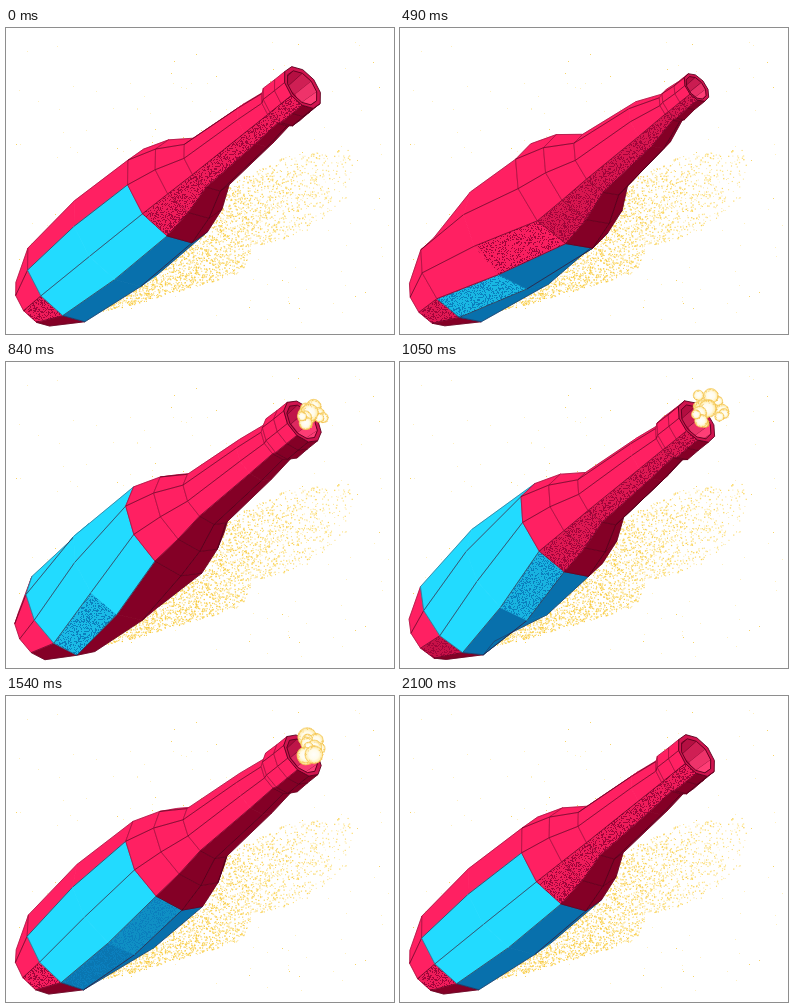
Animation, 388 px wide and 306 px high, one loop 2170 ms. Source, as an HTML page with a canvas:

```html
<!DOCTYPE html>
<html lang="en">
<head>
<meta charset="utf-8">
<title>Twisting bottle</title>
<style>
html, body { margin: 0; width: 100%; height: 100%; overflow: hidden; background: #fff; }
canvas { display: block; }
</style>
</head>
<body>
<canvas id="stage" width="388" height="306"></canvas>
<script>
const W = 388, H = 306, STEP = 70, STEPS = 31;
const ctx = document.getElementById('stage').getContext('2d');

// Bottle axis: mouth centre, direction to the mouth, direction across.
const MOUTH = [296.5, 59.5], U = [0.779, -0.627], V = [0.627, 0.779];
const SIDES = 10, FACET = 360 / SIDES, LABEL_SIDES = 5, START = -38, TILT = 0.56;

// Outline from base to mouth: [position on the axis, radius]
const PROFILE = [
  [-341, 29], [-307, 49], [-240, 57], [-173, 55], [-146, 46], [-123, 31],
  [-60, 25.5], [-32, 21.5], [-27, 25], [-13, 24.5], [0, 24.5]
];
const LABEL_FROM = 1, LABEL_TO = 3;
const SMOOTH = [2, 6];              // rings without a visible crease

const RED = [255, 32, 98], DARK_RED = [132, 0, 38];
const CYAN = [34, 219, 255], DARK_BLUE = [8, 112, 172];
const INK = 'rgba(60,0,25,0.65)';

const BURSTS = [
  { from: 8.5, life: 12.5, count: 14, reach: 50, seed: 8 },
  { from: 18.5, life: 10.5, count: 11, reach: 40, seed: 23 }
];

const rad = a => a * Math.PI / 180;
const clamp = x => Math.max(0, Math.min(1, x));
const lerp = (a, b, t) => a + (b - a) * t;
const smooth = x => { x = clamp(x); return x * x * (3 - 2 * x); };
const mix = (a, b, t) => `rgb(${a.map((c, i) => Math.round(lerp(c, b[i], t)))})`;

function seeded(seed) {
  return () => {
    seed = (seed + 0x6D2B79F5) | 0;
    let t = Math.imul(seed ^ seed >>> 15, 1 | seed);
    t = t + Math.imul(t ^ t >>> 7, 61 | t) ^ t;
    return ((t ^ t >>> 14) >>> 0) / 4294967296;
  };
}

function layer(w, h) {
  const c = document.createElement('canvas');
  c.width = w;
  c.height = h;
  return [c, c.getContext('2d')];
}

// One full turn: quick rise around the step `mid`, long settling.
function turn(f, mid, power) {
  const rise = x => x ** power / (x ** power + mid ** power);
  return 360 * rise(f) / rise(STEPS - 1);
}

// The base starts later than the neck and catches up faster, which twists the body.
function ringAngle(s, f) {
  return START + lerp(turn(f, 9.9, 6), turn(f, 10.2, 3.5), clamp((s + 307) / 134));
}

// At full squeeze the middle swells towards the neck and the mouth narrows.
function ringScale(s, f) {
  const squeeze = f <= 7 ? smooth((f - 1) / 6) : 1 - smooth((f - 7) / 4);
  return 1 + squeeze * (0.17 * smooth((s + 341) / 250) - 0.5 * smooth((s + 75) / 60));
}

const grains = {};
function grain(color, level) {
  const key = color + level;
  if (!grains[key]) {
    const size = 131, [tile, g] = layer(size, size), rnd = seeded(level * 77 + 5);
    g.fillStyle = color;
    for (let i = size * size * level / 10; i > 0; i--) {
      g.fillRect(Math.floor(rnd() * size), Math.floor(rnd() * size), 1, 1);
    }
    grains[key] = ctx.createPattern(tile, 'repeat');
  }
  return grains[key];
}

function makeShadow() {
  const [c, g] = layer(W, H), rnd = seeded(41);
  const shape = new Path2D('M92 284L125 277 178 262 236 244 246 219 298 205 345 166 352 119 278 128 215 160 150 215Z');
  g.fillStyle = '#fff';
  g.fillRect(0, 0, W, H);
  for (let i = 0; i < 22000; i++) {
    const x = 90 + rnd() * 265, y = 115 + rnd() * 172;
    const size = 0.7 + rnd() * 0.7, keep = 0.8 - (x - 100) / 330;
    if (rnd() > keep || !g.isPointInPath(shape, x, y)) continue;
    g.fillStyle = mix([247, 198, 50], [255, 236, 165], clamp((x - 190) / 170) * 0.5 + rnd() * 0.5);
    g.fillRect(x, y, size, size);
  }
  for (let i = 0; i < 170; i++) {
    g.fillStyle = rnd() < 0.3 ? '#f8d468' : '#fff0c0';
    g.fillRect(Math.floor(5 + rnd() * 380), Math.floor(14 + rnd() * 286), 1, 1);
  }
  return c;
}
const shadow = makeShadow();

function ring(s, r, f) {
  const angle = ringAngle(s, f), scaled = r * ringScale(s, f);
  const pts = Array.from({ length: SIDES }, (_, j) => {
    const a = rad(angle + j * FACET);
    const d = scaled * Math.sin(a), along = s - scaled * TILT * Math.cos(a);
    return [MOUTH[0] + along * U[0] + d * V[0], MOUTH[1] + along * U[1] + d * V[1]];
  });
  return { angle, pts };
}

function area(p) {
  return p.reduce((sum, [x, y], i) => {
    const [nx, ny] = p[(i + 1) % p.length];
    return sum + x * ny - nx * y;
  }, 0);
}

function trace(p) {
  ctx.beginPath();
  p.forEach(([x, y]) => ctx.lineTo(x, y));
  ctx.closePath();
}

function line(a, b) {
  ctx.strokeStyle = INK;
  ctx.lineWidth = 0.55;
  ctx.beginPath();
  ctx.moveTo(...a);
  ctx.lineTo(...b);
  ctx.stroke();
}

function fillFacet({ p, angle, blue }) {
  const t = clamp((angle + (blue ? 0 : 14) - 20) / 28);
  const color = blue ? mix(CYAN, DARK_BLUE, t) : mix(RED, DARK_RED, t * t);
  trace(p);
  ctx.fillStyle = ctx.strokeStyle = color;
  ctx.lineWidth = 0.8;
  ctx.fill();
  ctx.stroke();
  if (t > 0.05 && t < 1) {
    ctx.fillStyle = grain(blue ? '#0b7fbd' : '#a0053a', 3 + Math.round(t * 2));
    ctx.fill();
  }
}

// Quads between two rings that face the viewer, farthest first.
function visibleFaces(low, high) {
  const faces = [];
  for (let j = 0; j < SIDES; j++) {
    const n = (j + 1) % SIDES;
    const p = [low.pts[j], low.pts[n], high.pts[n], high.pts[j]];
    const raw = (low.angle + high.angle) / 2 + (j + 0.5) * FACET;
    const angle = ((raw + 180) % 360 + 360) % 360 - 180;
    if (area(p) < 0) faces.push({ p, angle, j });
  }
  return faces.sort((a, b) => Math.cos(rad(a.angle)) - Math.cos(rad(b.angle)));
}

function drawBottle(f) {
  const rings = PROFILE.map(([s, r]) => ring(s, r, f));
  for (let i = 0; i < rings.length - 1; i++) {
    const labelled = i >= LABEL_FROM && i < LABEL_TO;
    const faces = visibleFaces(rings[i], rings[i + 1]);
    faces.forEach(face => fillFacet({ ...face, blue: labelled && face.j < LABEL_SIDES }));
    faces.forEach(({ p }) => {
      line(p[0], p[3]);
      line(p[1], p[2]);
      if (!SMOOTH.includes(i)) line(p[0], p[1]);
      if (!SMOOTH.includes(i + 1)) line(p[3], p[2]);
    });
  }
  drawMouth(rings[rings.length - 1], f);
}

function drawMouth(lip, f) {
  const rim = ring(-0.5, 20, f), deep = ring(-20, 18, f);
  trace(lip.pts);
  ctx.fillStyle = '#d0144f';
  ctx.strokeStyle = '#5a001e';
  ctx.lineWidth = 0.9;
  ctx.fill();
  ctx.stroke();

  ctx.save();
  trace(rim.pts);
  ctx.fillStyle = '#a30a3a';
  ctx.fill();
  ctx.clip();
  visibleFaces(rim, deep).forEach(({ p, angle }) => {
    trace(p);
    ctx.fillStyle = mix([170, 8, 58], [255, 62, 118], clamp(0.6 + Math.sin(rad(angle)) * 0.6));
    ctx.fill();
    line(p[0], p[3]);
  });
  ctx.restore();
  trace(rim.pts);
  ctx.stroke();
}

function drawBubble(x, y, r, rnd) {
  if (r < 0.4) return;
  const g = ctx.createRadialGradient(x, y, 0, x, y, r);
  g.addColorStop(0, '#fffefa');
  g.addColorStop(0.55, '#fffbea');
  g.addColorStop(0.85, '#ffeeb5');
  g.addColorStop(1, '#f9d66c');
  ctx.fillStyle = g;
  ctx.beginPath();
  ctx.arc(x, y, r, 0, 7);
  ctx.fill();
  ctx.strokeStyle = '#f3c65a';
  ctx.lineWidth = 0.6;
  ctx.stroke();
  ctx.fillStyle = '#f2bf48';
  for (let i = 0; i < r * 4; i++) {
    const a = rnd() * 7, d = r * (1 - rnd() * rnd() * 0.35);
    ctx.fillRect(x + d * Math.cos(a), y + d * Math.sin(a), 0.8, 0.8);
  }
}

// Bubbles leave the mouth in a fan between straight up and right, then pop.
function drawBurst({ from, life, count, reach, seed }, f) {
  for (let i = 0; i < count; i++) {
    const rnd = seeded(seed * 100 + i), spread = i / (count - 1);
    const t = (f - from - rnd()) / (life - 1.5);
    const way = rad(-95 + 90 * ((i * 0.618) % 1));
    const dist = reach * (1 - 0.85 * spread) * Math.max(0, t) ** 0.8;
    const size = lerp(9.5, 4, rnd()) * smooth(t * 4) * (1 - smooth((t - 0.85) * 6));
    const x = 300 + (rnd() - 0.5) * 16 + dist * Math.cos(way);
    const y = 59 + (rnd() - 0.5) * 12 + dist * Math.sin(way);
    drawBubble(x, y, size, rnd);
  }
}

function draw(now) {
  const f = Math.floor(now / STEP) % STEPS;
  ctx.drawImage(shadow, 0, 0);
  ctx.lineJoin = 'round';
  drawBottle(f);
  BURSTS.forEach(burst => drawBurst(burst, f));
}

const begin = performance.now();
function tick() {
  draw(performance.now() - begin);
  requestAnimationFrame(tick);
}
tick();
</script>
</body>
</html>
```
